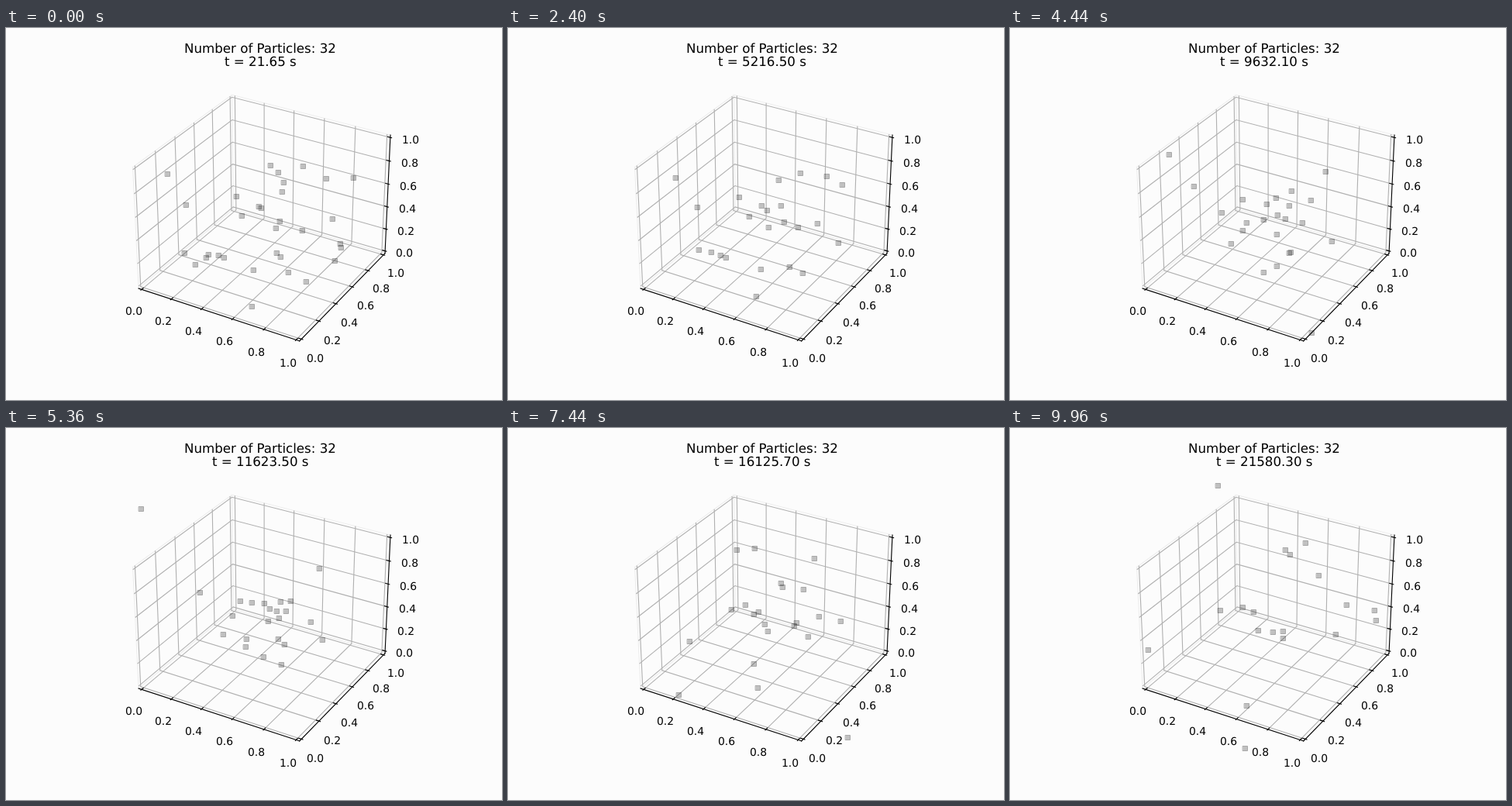
An HTML page with a canvas that plays this animation: 640x480 px, repeating every 10000 ms.

```html
<!DOCTYPE html>
<html lang="en">
<head>
<meta charset="utf-8">
<title>Particles</title>
<style>
html, body { margin: 0; width: 100%; height: 100%; overflow: hidden; background: #fcfcfc; }
canvas { display: block; width: 640px; height: 480px; }
</style>
</head>
<body>
<canvas id="stage" width="640" height="480"></canvas>
<script>
const ctx = document.getElementById('stage').getContext('2d');
const FRAME_MS = 40, FRAMES = 250, LAST = FRAMES - 1;
const VIEW = { x: 143.2, y: 57.6, size: 369.6 };
const LO = -1 / 48, HI = 1 + 1 / 48;
const TICKS = [0, 0.2, 0.4, 0.6, 0.8, 1];
const PANE = '#eeeeee', GRID = '#b0b0b0', INK = '#000';

// Perspective camera at elevation 30°, azimuth -60°, distance 10
function project([x, y, z]) {
  const px = (x - 0.5) * 8 / 7, py = (y - 0.5) * 8 / 7, pz = (z - 0.5) * 6 / 7;
  const c = Math.sqrt(3) / 2;
  const right = c * px + 0.5 * py;
  const up = -0.25 * px + c / 2 * py + c * pz;
  const depth = 10 - (c / 2 * px - 0.75 * py + 0.5 * pz);
  const scale = VIEW.size / 0.185;
  return [VIEW.x + scale * (0.095 + right / depth),
          VIEW.y + VIEW.size - scale * (0.095 + up / depth)];
}

function line(color, ...points) {
  ctx.beginPath();
  points.forEach(p => ctx.lineTo(...project(p)));
  ctx.strokeStyle = color;
  ctx.lineWidth = 1.11;
  ctx.lineCap = color === INK ? 'square' : 'butt';
  ctx.stroke();
}

function text(str, cx, baseline, size) {
  ctx.font = `${size}px "DejaVu Sans", sans-serif`;
  ctx.textRendering = 'geometricPrecision';
  ctx.fillStyle = INK;
  ctx.fillText(str, Math.round(cx - ctx.measureText(str).width / 2), Math.round(baseline));
}

function label(value, at) {
  const [x, y] = project(at);
  text(value.toFixed(1), x, y + 11, 13.889);
}

function drawAxes() {
  line(PANE, [LO, LO, LO], [LO, HI, LO], [LO, HI, HI], [LO, LO, HI], [LO, LO, LO]);
  line(PANE, [LO, HI, LO], [HI, HI, LO], [HI, HI, HI], [LO, HI, HI]);
  line(PANE, [LO, LO, LO], [HI, LO, LO], [HI, HI, LO]);
  for (const v of TICKS) {
    line(GRID, [v, LO, LO], [v, HI, LO], [v, HI, HI]);
    line(GRID, [HI, v, LO], [LO, v, LO], [LO, v, HI]);
    line(GRID, [LO, LO, v], [LO, HI, v], [HI, HI, v]);
  }
  line(INK, [LO, LO, LO], [HI, LO, LO]);
  line(INK, [HI, LO, LO], [HI, HI, LO]);
  line(INK, [HI, HI, LO], [HI, HI, HI]);
  const out = 0.1 / 12, inside = 0.2 / 12, gap = 0.0864;
  for (const v of TICKS) {
    line(INK, [v, LO - out, LO], [v, LO + inside, LO]);
    line(INK, [HI + out, v, LO], [HI - inside, v, LO]);
    line(INK, [HI + out, HI, v], [HI - inside, HI, v]);
    label(v, [v, LO - gap, LO - gap]);
    label(v, [HI + gap, v, LO - gap]);
    label(v, [HI + gap, HI + gap, v]);
  }
}

const particles = [];
const CENTRE = [342, 252];
const mix = (a, b, u) => a.map((v, i) => v + (b[i] - v) * u);

// Free fall from rest, a pass near the centre at frame `pass`, then a straight way out
function fall(x, y, endX, endY, pass = 145) {
  const start = [x, y], end = [endX, endY];
  const near = CENTRE.map((c, i) => c + 0.12 * (start[i] + end[i] - 2 * c));
  particles.push(frame => frame < pass
    ? mix(start, near, (frame / pass) ** 2)
    : mix(near, end, (frame - pass) / (LAST - pass)));
}

// Steady acceleration that never reaches the crowd
function glide(x, y, endX, endY) {
  particles.push(frame => mix([x, y], [endX, endY], (frame / LAST) ** 2));
}

// Rest until a close encounter, then constant velocity
function fling(x, y, vx, vy, at) {
  particles.push(frame => {
    const t = Math.max(0, frame - at);
    return [x + vx * t, y + vy * t];
  });
}

glide(208, 188, 352, 271);
glide(297, 217, 314, 237);
glide(304, 242, 420, 266);
glide(413, 194, 381, 148);
glide(431, 278, 352, 262);

fall(230, 290, 305, 358);
fall(326, 230, 294, 48);
fall(329, 232, 470, 235);
fall(351, 186, 300, 231);
fall(383, 178, 361, 163);
fall(448, 193, 271, 235);
fall(387, 327, 320, 261);
fall(317, 359, 303, 413);
fall(244, 305, 268, 74, 125);
fall(421, 246, 112, 419, 125);
fall(382, 261, 355, 157, 125);
fall(356, 211, 398, 190, 75);
fall(353, 249, 472, 248, 85);
fall(348, 258, 178, 286, 85);
fall(232, 228, 339, 263, 170);
fall(364, 315, 434, 228, 170);
fall(319, 312, 589, 609, 157);

fling(274, 293, -1.35, -2.55, 60);
fling(281, 296, 2.12, 1.9, 60);
fling(258, 296, -2.43, 2.46, 0);

// Early escapes fan out through the upper half
[[424, 300], [432, 283], [354, 295], [349, 290], [358, 199], [341, 177], [261, 292]]
  .forEach(([x, y], i) => {
    const angle = (30 + 20 * i) * Math.PI / 180;
    fling(x, y, 8 * Math.cos(angle), -8 * Math.sin(angle), 20);
  });

function drawParticles(frame) {
  ctx.save();
  ctx.beginPath();
  ctx.rect(VIEW.x, VIEW.y, VIEW.size, VIEW.size);
  ctx.clip();
  ctx.fillStyle = ctx.strokeStyle = 'rgba(0, 0, 0, 0.24)';
  ctx.lineWidth = 1;
  for (const place of particles) {
    const [x, y] = place(frame).map(Math.round);
    ctx.beginPath();
    ctx.rect(x - 2.5, y - 2.5, 6, 6);
    ctx.fill();
    ctx.stroke();
  }
  ctx.restore();
}

function draw(now) {
  const frame = Math.floor(now / FRAME_MS) % FRAMES;
  const seconds = Math.round(21.645212 * (4 * frame + 1) * 20) / 20;
  ctx.fillStyle = '#fcfcfc';
  ctx.fillRect(0, 0, 640, 480);
  drawAxes();
  drawParticles(frame);
  text(`Number of Particles: ${particles.length}`, 328, 32, 16.667);
  text(`t = ${seconds.toFixed(2)} s`, 328, 49, 16.667);
}

let start;
function tick(now) {
  start ??= now;
  draw(now - start);
  requestAnimationFrame(tick);
}
draw(0);
requestAnimationFrame(tick);
</script>
</body>
</html>
```
